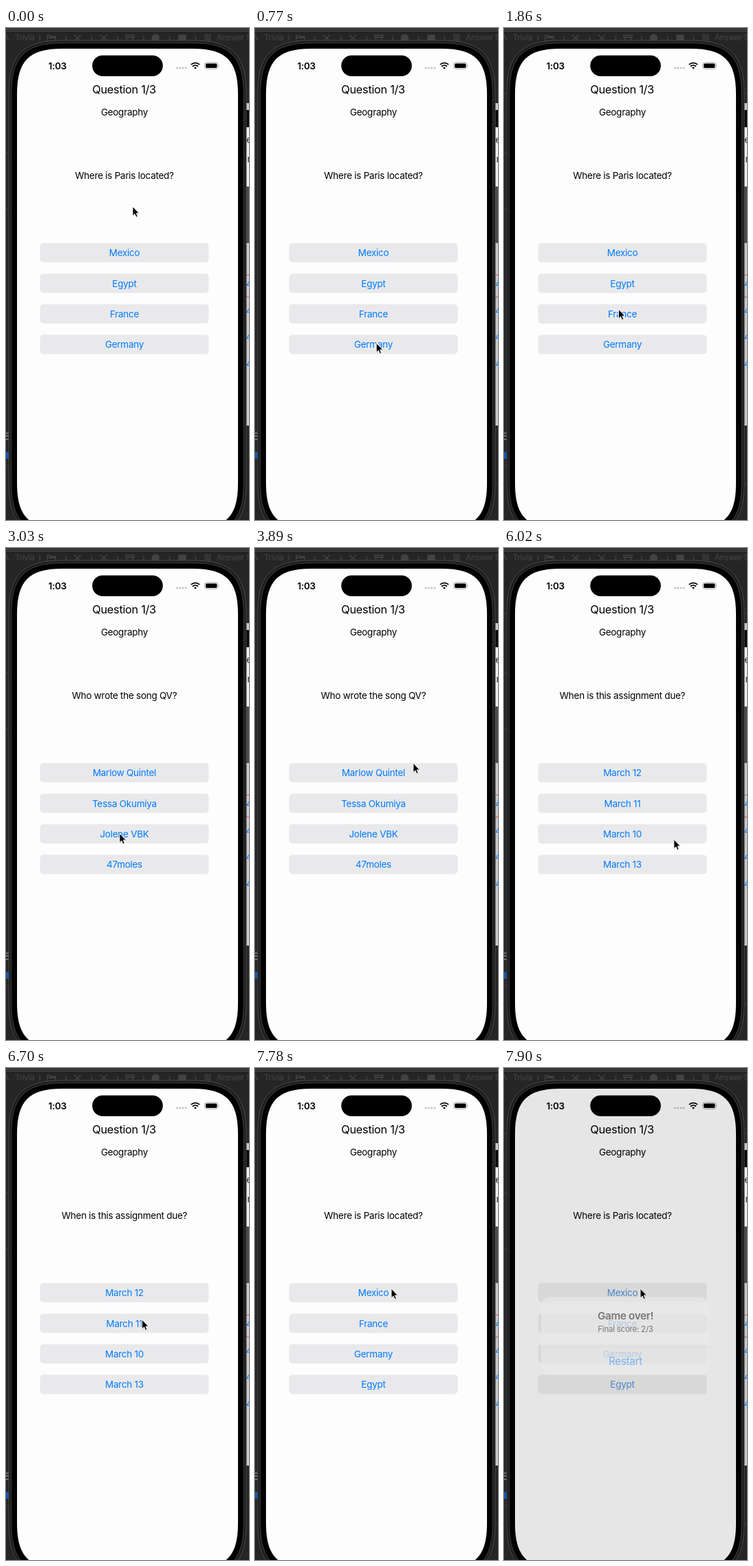
These frames come from a looping animation (353x714 px, 7990 ms). An HTML page:

```html
<!DOCTYPE html>
<html lang="en">
<head>
<meta charset="utf-8">
<title>Trivia quiz</title>
<style>
html, body { margin: 0; width: 100%; height: 100%; overflow: hidden; background: #252525; }
svg { display: block; width: 353px; height: 714px; }
text { font: 13.5px Inter, Roboto, sans-serif; letter-spacing: -.02em; text-anchor: middle; }
.left { text-anchor: start; }
.small { font-size: 11.5px; }
.large { font-size: 15.2px; }
.title { font-size: 16.4px; }
.bold { font-weight: 600; }
.blue { fill: #007aff; }
.button { fill: #e9e9eb; }
#alert { visibility: hidden; }
.over #alert { visibility: visible; }
.over #buttons .blue { fill: #5193dc; }
.over .button { fill: #ededed; }
</style>
</head>
<body>
<svg id="stage" viewBox="0 0 353 714">
  <!-- editor behind the phone -->
  <rect width="353" height="714" fill="#252525"/>
  <rect width="353" height="6" fill="#383838"/>
  <path d="M0 6.5H353" stroke="#1c1c1c"/>
  <path d="M0 95H5M0 181H5M0 262H5M0 635H5M348 95H353M348 662H353" stroke="#3b3b3b"/>
  <g fill="none" stroke="#434343" stroke-width="1.3">
    <g id="chevrons"></g>
    <path d="M60 11h4l1.5 1.5H72V19H60ZM60 14h12M99 10l10 9M109 10l-10 9M137 10l10 9M147 10l-10 9M0 10l4 8"/>
    <path d="M174 10.5h12v3h-12ZM175.5 14v5h9v-5M288 10h10M288 13h10M288 16h10M288 19h10"/>
    <path d="M251 10.5h10v8h-10Z" fill="#434343"/>
    <circle cx="217.5" cy="14.5" r="5" fill="#434343"/>
  </g>
  <g fill="#464646">
    <text class="left small" x="13" y="18">Trivia</text>
    <text class="left small" x="306" y="18">Answer S</text>
  </g>
  <path d="M0 588H4M0 592H4M0 597H4" stroke="#8a8a8a" stroke-width="1.5"/>
  <rect y="615" width="4" height="10" fill="#1459a8"/>
  <rect x="347" y="109" width="6" height="468" fill="#c9c9cb"/>
  <rect x="347" y="119" width="6" height="25" fill="#080808"/>
  <rect x="347" y="144" width="6" height="86" fill="#eee"/>
  <rect x="347" y="230" width="6" height="82" fill="#4b4b4d"/>
  <path d="M347 358.5H353M347 390.5H353" stroke="#e0463c"/>
  <g fill="#222"><text x="353" y="167">e</text><text x="353" y="195">r</text></g>
  <g id="peek"></g>

  <!-- phone -->
  <path id="frame" fill="#1b1b1b" stroke="#4b4b4b"/>
  <path id="bezel" stroke="#343434" stroke-width="1.5"/>
  <path id="screen" fill="#fdfdfd"/>
  <text class="bold" x="74.7" y="59.5">1:03</text>
  <g fill="#c4c4c6" id="dots"></g>
  <path d="M268.9 53.1a8.8 8.8 0 0 1 12.2 0M271.1 55.7a5.7 5.7 0 0 1 7.8 0" fill="none" stroke="#000" stroke-width="1.9"/>
  <path d="M275 59.8l-2-2.2a3 3 0 0 1 4 0Z"/>
  <rect x="288.5" y="50" width="19.5" height="9.5" rx="3" fill="none" stroke="#a5a5a7" stroke-width=".9"/>
  <rect x="290" y="51.5" width="16.5" height="6.5" rx="1.7"/>
  <path d="M309.2 53v3.5q1.2-1.7 0-3.5" fill="#a5a5a7"/>
  <text class="title" x="171.6" y="95">Question 1/3</text>
  <text x="172" y="127">Geography</text>
  <text x="172" y="219" id="question"></text>
  <g id="buttons"></g>

  <!-- alert fading in -->
  <g id="alert">
    <path id="dim" opacity=".09"/>
    <rect x="54" y="332.5" width="244" height="113" rx="12" fill="#e9e9e9" opacity=".68"/>
    <path d="M54 404.5H298" stroke="#d9d9d9"/>
    <g fill="#777">
      <text class="large bold" x="176.5" y="365">Game over!</text>
      <text class="small" x="176.5" y="383">Final score: 2/3</text>
    </g>
    <text class="large" x="176.5" y="430.5" fill="#75b3f7">Restart</text>
  </g>
  <rect x="125.3" y="39.7" width="102.5" height="30.2" rx="15.1"/>

  <g id="cursor">
    <path d="M1.5 2V15.5L4.4 12.7 6.4 17.2 8.7 16.2 6.8 11.8H10.8Z" opacity=".2"/>
    <path d="M1 1.2V14.6L4 11.8 6 16.4 8.3 15.4 6.3 10.9H10.4Z" stroke="#fff" stroke-width=".9"/>
  </g>
</svg>
<script>
const LOOP = 7990, ALERT = 7900, STEP = 57;
const $ = id => document.getElementById(id);
const repeat = (id, count, tpl) => {
  $(id).innerHTML = Array.from({ length: count }, (_, i) => tpl(i)).join('');
};

repeat('chevrons', 7, i => `<path d="M${48 + 37.7 * i} 11l2 3.5l-2 3.5"/>`);
repeat('peek', 4, i => `<text class="blue" x="353" y="${376 + 38.7 * i}">4</text>`);
repeat('dots', 4, i => `<circle cx="${248.2 + 4.3 * i}" cy="58" r="1.5"/>`);
repeat('buttons', 4, i => {
  const y = 312 + 44.4 * i;
  return `<rect class="button" x="49.5" y="${y}" width="245" height="28" rx="5"/>
    <text class="blue" x="172" y="${y + 19.2}"></text>`;
});
const labels = [...$('buttons').querySelectorAll('text')];

// phone outline grown by a margin, with continuous corners
function outline(margin) {
  const l = 16 - margin, r = 337 + margin, t = 30 - margin, b = 726.5 + margin;
  const e = 66 + margin, c = e * .265;
  return `M${l} ${t + e}C${l} ${t + c} ${l + c} ${t} ${l + e} ${t}
    H${r - e}C${r - c} ${t} ${r} ${t + c} ${r} ${t + e}
    V${b - e}C${r} ${b - c} ${r - c} ${b} ${r - e} ${b}
    H${l + e}C${l + c} ${b} ${l} ${b - c} ${l} ${b - e}Z`;
}
const shape = (id, margin) => $(id).setAttribute('d', outline(margin));
shape('frame', 12);
shape('bezel', 8.5);
shape('screen', 0);
shape('dim', 0);

const rounds = [
  { from: 0, tap: 2880, picked: 2, question: 'Where is Paris located?',
    answers: ['Mexico', 'Egypt', 'France', 'Germany'] },
  { from: 3030, tap: 5260, picked: 1, question: 'Who wrote the song QV?',
    answers: ['Marlow Quintel', 'Tessa Okumiya', 'Jolene VBK', '47moles'] },
  { from: 5440, tap: 7660, picked: 0, question: 'When is this assignment due?',
    answers: ['March 12', 'March 11', 'March 10', 'March 13'] },
  { from: 7780, tap: LOOP, picked: 0, question: 'Where is Paris located?',
    answers: ['Mexico', 'France', 'Germany', 'Egypt'] }
];

// each gesture is a cubic curve from where the last one ended
const home = [183, 258];
const moves = [
  { start: 90, end: 770, curve: [[212, 320], [165, 420], [177, 467]] },
  { start: 1070, end: 1860, curve: [[184, 400], [172, 375], [164, 413]] },
  { start: 3260, end: 4000, curve: [[165, 250], [258, 280], [220, 331]] },
  { start: 4060, end: 4850, curve: [[200, 436], [172, 436], [178, 366]] },
  { start: 5620, end: 6360, curve: [[230, 265], [289, 520], [204, 488]] },
  { start: 6420, end: 6760, curve: [[199, 430], [195, 370], [197, 319]] }
];

function cursorAt(t) {
  let at = home;
  for (const { start, end, curve: [b, c, d] } of moves) {
    if (t < start) break;
    const step = Math.floor((t - start) / STEP) + 1;
    const p = Math.min(1, step * STEP / (end - start + STEP)), q = 1 - p;
    at = at.map((a, n) => q ** 3 * a + 3 * q * q * p * b[n] + 3 * q * p * p * c[n] + p ** 3 * d[n]);
  }
  return at;
}

const origin = performance.now();
function draw(now) {
  const t = Math.max(0, now - origin) % LOOP;
  const round = rounds.findLast(r => t >= r.from);
  $('question').textContent = round.question;
  labels.forEach((label, i) => {
    label.textContent = round.answers[i];
    label.setAttribute('opacity', t >= round.tap && i === round.picked ? .3 : 1);
  });
  $('stage').classList.toggle('over', t >= ALERT);
  $('cursor').setAttribute('transform', `translate(${cursorAt(t)})`);
  requestAnimationFrame(draw);
}
draw(origin);
</script>
</body>
</html>
```
